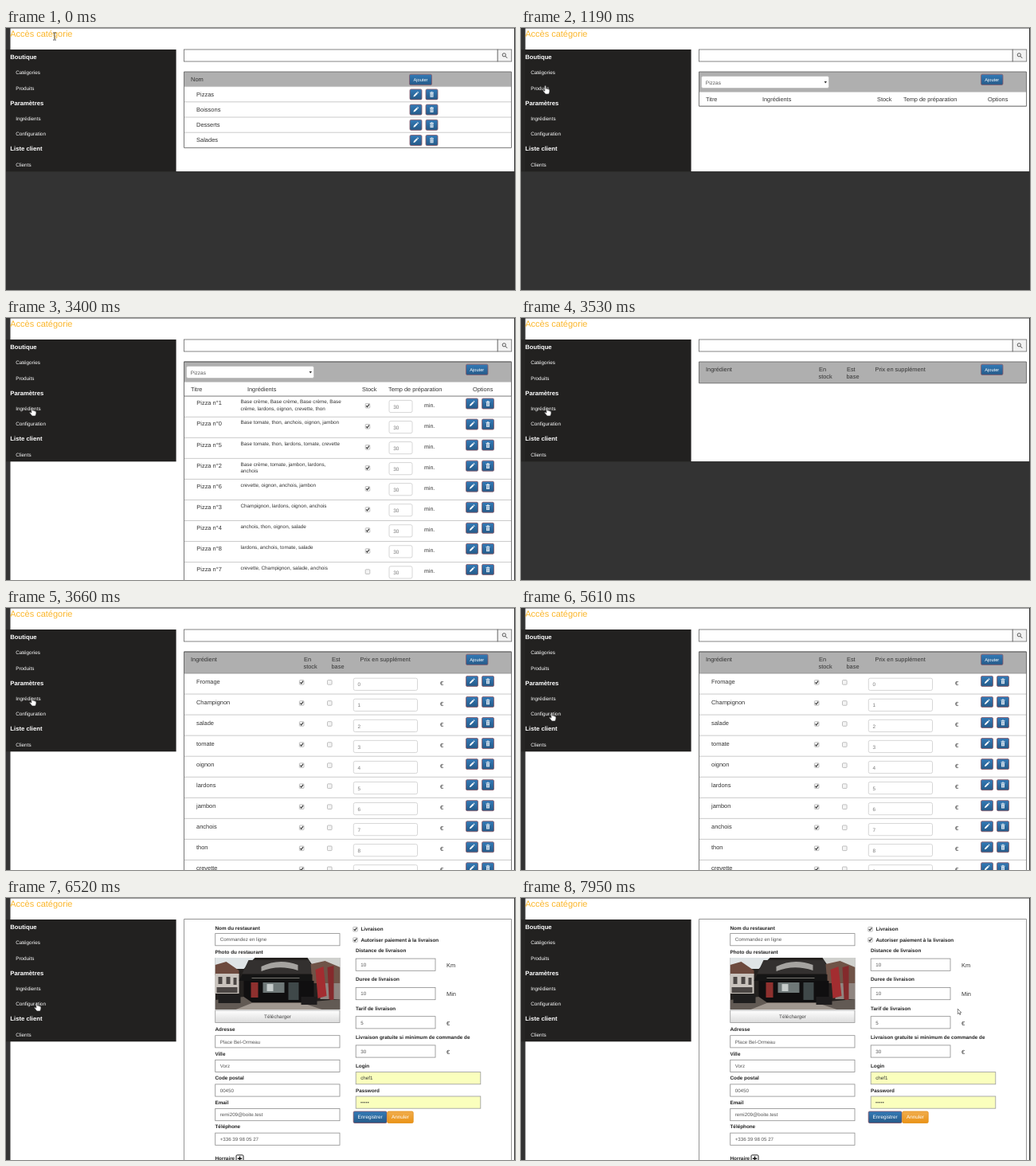
An HTML page that plays this animation: 639x329 px, repeating every 8000 ms.

```html
<!DOCTYPE html>
<html lang="fr">
<head>
<meta charset="utf-8">
<title>Gestion du restaurant</title>
<style>
  html, body { margin: 0; width: 100%; height: 100%; overflow: hidden; background: #333; }
  svg { display: block; width: 100vw; height: 100vh; }
  text { font-family: "Liberation Sans", Arial, sans-serif; text-rendering: geometricPrecision; white-space: pre; }
</style>
</head>
<body>
<svg id="stage" viewBox="0 0 639 329"></svg>
<script>
const LOOP = 8000;
const ROW = 26.05;

// Drawing helpers, all returning SVG markup
const rect = (x, y, w, h, fill, stroke = 'none', sw = 0.8, rx = 0) =>
  `<rect x="${x}" y="${y}" width="${w}" height="${h}" fill="${fill}" stroke="${stroke}" stroke-width="${sw}" rx="${rx}"/>`;
const path = (d, fill, stroke = 'none', sw = 1) =>
  `<path d="${d}" fill="${fill}" stroke="${stroke}" stroke-width="${sw}"/>`;
const text = (x, y, s, size = 7.5, fill = '#333', extra = '') =>
  `<text x="${x}" y="${y}" font-size="${size}" fill="${fill}" ${extra}>${s}</text>`;
const bold = (x, y, s, size = 6.33, fill = '#222') => text(x, y, s, size, fill, 'font-weight="bold"');
const hline = (y, color = '#c4c4c4') => path(`M224 ${y}H634.5`, 'none', color, 0.9);
const group = (id, body) => `<g id="${id}">${body}</g>`;
const rows = (list, draw) => list.map(draw).join('');

const button = (x, y, w, h, label, size = 5.7, fill = 'url(#blue)', edge = '#8d5a66') =>
  rect(x, y, w, h, fill, edge, 0.8, 1.5) +
  text(x + w / 2, y + h / 2 + size * 0.35, label, size, '#fff', 'text-anchor="middle"');

const pencil = (x, y) =>
  path(`M${x - 3} ${y + 3}l.6 -2 3.6 -3.6 1.4 1.4 -3.6 3.6zM${x + 1.7} ${y - 3.1}l.7 -.6 1.4 1.4 -.7 .6z`, '#fff');
const bin = (x, y) =>
  path(`M${x - 2.5} ${y - 2.2}h5M${x - 0.8} ${y - 3}h1.6`, 'none', '#fff', 0.9) +
  rect(x - 2, y - 1.3, 4, 4.6, '#e8eef5') +
  path(`M${x - 0.7} ${y - 0.6}v3.2M${x + 0.7} ${y - 0.6}v3.2`, 'none', '#2d6a9f', 0.5);
const tools = (x, y) =>
  button(x, y, 15, 13, '') + pencil(x + 7.4, y + 6.5) +
  button(x + 20, y, 15, 13, '') + bin(x + 27.5, y + 6.5);

const check = (x, y, on) =>
  rect(x - 2.8, y - 2.8, 5.6, 5.6, '#f4f4f4', '#a8a8a8', 0.7, 0.8) +
  (on ? path(`M${x - 1.8} ${y}l1.3 1.5 2.4 -3.3`, 'none', '#333', 1.1) : '');
const field = (x, y, w, value, edge = '#8c8c8c', fill = '#fff', color = '#555') =>
  rect(x, y, w, 15.2, fill, edge, 0.8) + text(x + 6, y + 9.8, value, 6.2, color);
const softField = (x, y, w, value) =>
  rect(x, y, w, 15.2, '#fff', '#ccc', 0.8, 2) + text(x + 5.2, y + 10.2, value, 6.4, '#777');

const frame = (y, bottom, color = '#6a6a6a') =>
  path(`M223.5 ${bottom}V${y}H634.5V${bottom}z`, 'none', color, 0.9);
const searchBar =
  rect(223.5, 27, 393.7, 15, '#fff', '#666') + rect(617.2, 27, 17.5, 15, '#f2f2f2', '#666') +
  `<circle cx="625.3" cy="33.8" r="2.1" fill="none" stroke="#333" stroke-width=".8"/>` +
  path('M626.9 35.4l2.2 2.3', 'none', '#333', 1);
const head = h => rect(223.5, 55, 411, h, '#afafaf');

function sidebar() {
  const titles = [['Boutique', 39], ['Paramètres', 96.6], ['Liste client', 154.2]];
  const links = [['Catégories', 58.4], ['Produits', 77.6], ['Ingrédients', 116], ['Configuration', 135.2], ['Clients', 173.6]];
  return rect(5, 27, 208.6, 153.3, '#222120') +
    rows(titles, ([s, y]) => bold(5.3, y, s, 7.7, '#fff')) +
    rows(links, ([s, y]) => text(12.2, y, s, 6.35, '#fff'));
}

function categories() {
  return head(18.6) + text(232, 67.2, 'Nom') + button(506.5, 58.2, 28, 13.4, 'Ajouter') +
    rows(['Pizzas', 'Boissons', 'Desserts', 'Salades'], (s, i) => {
      const y = 73.6 + i * 19.2;
      return hline(y) + text(239, y + 12.1, s) + tools(507, y + 3.3);
    }) + frame(55, 150.4);
}

function productsHead() {
  const cols = [[232, 'Titre'], [303, 'Ingrédients'], [447, 'Stock'], [480, 'Temp de préparation'], [586, 'Options']];
  return head(25.5) + rect(226.5, 60.5, 160, 15, '#fff', '#bbb', 0.8, 2) +
    text(231.8, 70.8, 'Pizzas', 6.5, '#555') + path('M380.6 67h3.4l-1.7 2.6z', '#333') +
    button(577.5, 58.2, 27.5, 13.2, 'Ajouter') +
    rows(cols, ([x, s]) => text(x, 92.4, s, 7.35)) + hline(98.2);
}

function products() {
  const list = [
    [1, 'Base crème, Base crème, Base crème, Base', 'crème, lardons, oignon, crevette, thon'],
    [0, 'Base tomate, thon, anchois, oignon, jambon'],
    [5, 'Base tomate, thon, lardons, tomate, crevette'],
    [2, 'Base crème, tomate, jambon, lardons,', 'anchois'],
    [6, 'crevette, oignon, anchois, jambon'],
    [3, 'Champignon, lardons, oignon, anchois'],
    [4, 'anchois, thon, oignon, salade'],
    [8, 'lardons, anchois, tomate, salade'],
    [7, 'crevette, Champignon, salade, anchois']
  ];
  return rows(list, ([n, a, b = ''], i) => {
    const y = 98.2 + i * ROW;
    return hline(y) + text(239.3, y + 11.2, 'Pizza n°' + n, 7.45) +
      text(294.5, y + 9.2, a, 6.33) + text(294.5, y + 17.8, b, 6.33) +
      check(454, y + 12, n !== 7) + softField(481, y + 5.2, 29, '30') +
      text(525, y + 13.6, 'min.', 7) + tools(577.5, y + 2.8);
  }) + frame(55, 332);
}

function ingredientsHead() {
  const cols = [[232, 67, 'Ingrédient'], [374, 67, 'En'], [373.5, 76.4, 'stock'], [409, 67, 'Est'], [408.5, 76.4, 'base'], [444.5, 67, 'Prix en supplément']];
  return head(26.8) + rows(cols, ([x, y, s]) => text(x, y, s, 7.4)) +
    button(577.5, 58.2, 27.5, 13.2, 'Ajouter');
}

function ingredients() {
  const list = ['Fromage', 'Champignon', 'salade', 'tomate', 'oignon', 'lardons', 'jambon', 'anchois', 'thon', 'crevette'];
  return rows(list, (s, i) => {
    const y = 82 + i * ROW;
    return hline(y) + text(239, y + 12.6, s, 7.45) + check(371.2, y + 11.4, true) + check(406.3, y + 11.4, false) +
      softField(436.3, y + 6.2, 80.2, i) + text(545, y + 15, '€', 7.4) + tools(577.5, y + 3.4);
  }) + frame(55, 332);
}

// Dark shopfront between pale houses, red banners on the right
function photo() {
  return `<svg x="262.5" y="75" width="157" height="65" viewBox="0 0 157 65">` +
    rect(0, 0, 157, 65, '#24211f') + path('M0 0H50L36 14H0z', '#dfe4e6') +
    path('M0 9L14 5 30 16V22H0z', '#6d4a3e') + rect(0, 20, 30, 25, '#c9c3bd') +
    path('M4 24h5v9h-5zM14 24h5v9h-5zM23 25h4v9h-4zM2 37h26v7H2z', '#4b4644') +
    path('M42 3H118L124 20H34z', '#33302f') + path('M58 11Q80 0 104 9V16Q80 8 58 17z', '#a5a3a0') +
    path('M116 0H157V16L124 12z', '#cfd0cd') + path('M120 8L138 4 157 12V32H122z', '#6f5347') +
    path('M34 21H122V29H30z', '#151515') + path('M46 25.5H106', 'none', '#77756f', 1.2) +
    rect(36, 29, 88, 27, '#100f10') + rect(45, 31, 9, 19, '#8e302e') +
    rect(60, 31, 27, 13, '#6f7878') + rect(65, 33, 8, 9, '#c6cccb') + rect(92, 31, 13, 22, '#3f4849') +
    rect(132, 32, 25, 20, '#8f8580') + path('M126 15L136 11 140 48 129 51z', '#a32d30') +
    path('M141 12L149 10V55L143 52z', '#842a2c') +
    path('M0 65V53L36 49 46 56H112L157 52V65z', '#625a54') + path('M26 65L46 57H110L134 65z', '#a0978f') +
    rect(4, 46, 28, 11, '#1f1e1e') + rect(108, 49, 20, 10, '#1e1c1d') + `</svg>`;
}

function settings() {
  const left = [['Adresse', 'Place Bel-Ormeau'], ['Ville', 'Vorz'], ['Code postal', '00450'],
    ['Email', 'remi209@boite.test'], ['Téléphone', '+336 39 98 05 27']];
  const right = [['Distance de livraison', 10, 'Km', 68], ['Duree de livraison', 10, 'Min', 104.4],
    ['Tarif de livraison', 5, '€', 140.6], ['Livraison gratuite si minimum de commande de', 30, '€', 176.8]];
  const dots = rows([0, 1, 2, 3, 4], i => `<circle cx="${446 + i * 2.2}" cy="256.8" r=".75" fill="#333"/>`);
  return frame(26.5, 332, '#8a8a8a') +
    bold(262.5, 39.5, 'Nom du restaurant') + field(262.7, 44.6, 156.3, 'Commandez en ligne') +
    bold(262.5, 70, 'Photo du restaurant') + photo() +
    rect(262.7, 141, 156.3, 15.5, 'url(#grey)', '#999') +
    text(341, 151, 'Télécharger', 6.35, '#444', 'text-anchor="middle"') +
    rows(left, ([label, value], i) => {
      const y = 167 + i * 30.6;
      return bold(262.5, y, label) + field(262.7, y + 5.7, 156.3, value);
    }) +
    bold(262.5, 329, 'Horraire') + rect(289, 322.8, 9, 9, '#fff', '#222', 1, 1.2) +
    path('M290.8 327.2h5.4M293.5 324.5v5.4', 'none', '#111', 1.5) +
    check(438.5, 39.2, true) + bold(445.4, 41.4, 'Livraison') +
    check(438.5, 52.6, true) + bold(445.4, 54.8, 'Autoriser paiement à la livraison') +
    rows(right, ([label, value, unit, y]) =>
      bold(439, y, label) + field(439.2, y + 8.1, 99.8, value) + text(553, y + 18.9, unit, 7.4)) +
    bold(439, 213, 'Login') + field(439.2, 218.6, 156.6, 'chef1', '#999', '#faffbd', '#333') +
    bold(439, 243.6, 'Password') + field(439.2, 249, 156.6, '', '#999', '#faffbd') + dots +
    button(436.2, 268, 41.8, 14.5, 'Enregistrer', 6.35, 'url(#blue)', '#7c4b60') +
    button(478.8, 268, 32.4, 14.5, 'Annuler', 6.35, 'url(#orange)', '#e38d13');
}

const cursors = {
  beam: path('M-2 -4.5h1.4L0 -4 .6 -4.5H2M0 -4V4M-2 4.5h1.4L0 4 .6 4.5H2', 'none', '#444', 0.9),
  arrow: path('M0 0V6.4L1.5 5.1 2.5 7.4 3.5 7 2.5 4.8H4.5z', '#fff', '#333', 0.6),
  hand: path('M2.6 .6C3.4 0 4.2 .5 4.2 1.3V4.2C5 3.7 5.6 4 5.8 4.6 6.5 4.2 7.1 4.5 7.3 5.1 8.1 4.8 8.7 5.2 8.7 6V8.2L7.7 11H3.6L.6 7.3C.1 6.5 .9 5.8 1.6 6.3L2.6 7.2z', '#fff', '#222', 0.6)
};

const gradient = (id, a, b) =>
  `<linearGradient id="${id}" x2="0" y2="1"><stop stop-color="${a}"/><stop offset="1" stop-color="${b}"/></linearGradient>`;

const stage = document.getElementById('stage');
stage.innerHTML =
  `<defs>${gradient('blue', '#337ab7', '#265a88')}${gradient('orange', '#f0ad4e', '#eb9316')}${gradient('grey', '#fff', '#dcdcdc')}</defs>` +
  rect(0, 0, 639, 329, '#333') + rect(0, 27, 5, 153.3, '#262524') +
  `<rect id="page" x="5.5" y=".5" width="632.5" fill="#fff"/>` +
  text(5.2, 11, 'Accès catégorie', 11, '#fbb62b') + sidebar() +
  group('search', searchBar) +
  group('categories', categories()) +
  group('productsHead', productsHead() + frame(55, 98.2)) +
  group('products', products()) +
  group('ingredientsHead', ingredientsHead() + frame(55, 81.8)) +
  group('ingredients', ingredients()) +
  group('settings', settings()) +
  Object.keys(cursors).map(k => group(k, cursors[k])).join('');

const el = id => document.getElementById(id);
const at = (keys, t) => keys.filter(k => k[0] <= t).pop();

// [start, page height, visible parts]
const scenes = [
  [0, 180, 'search categories'],
  [1060, 180, 'search productsHead'],
  [1580, 329, 'search productsHead products'],
  [3530, 180, 'search ingredientsHead'],
  [3660, 329, 'search ingredientsHead ingredients'],
  [6390, 329, 'settings']
];
const parts = ['search', 'categories', 'productsHead', 'products', 'ingredientsHead', 'ingredients', 'settings'];

// [start, cursor, x, y], each held until the next
const moves = [
  [0, 'beam', 61, 10.5], [130, 'arrow', 56, 38], [270, 'arrow', 48, 48], [400, 'arrow', 37, 63],
  [530, 'arrow', 29, 72.5], [790, 'hand', 27.2, 72],
  [2360, 'hand', 27.8, 75], [2490, 'arrow', 31, 85], [2620, 'arrow', 33, 98], [2750, 'hand', 31.5, 108], [2880, 'hand', 29.2, 112],
  [5220, 'hand', 29.8, 115], [5350, 'arrow', 34, 122], [5480, 'hand', 34.5, 128], [5610, 'hand', 35.2, 131]
];
for (let i = 0; i < 7; i++) {
  const p = (i + 1) / 7, s = p * p * (3 - 2 * p);
  moves.push([7040 + 130 * i, 'arrow', 38 + 520 * s, 132 - 6 * s]);
}
moves.push([7950, 'arrow', 548.3, 139.2]);

function draw(t) {
  const [, height, visible] = at(scenes, t);
  const shown = visible.split(' ');
  el('page').setAttribute('height', height - 0.5);
  for (const id of parts) el(id).style.display = shown.includes(id) ? '' : 'none';
  const [, kind, x, y] = at(moves, t);
  for (const id in cursors) el(id).style.display = id === kind ? '' : 'none';
  el(kind).setAttribute('transform', `translate(${x} ${y})`);
}

const start = performance.now();
function tick() {
  draw((performance.now() - start) % LOOP);
  requestAnimationFrame(tick);
}
tick();
</script>
</body>
</html>
```
